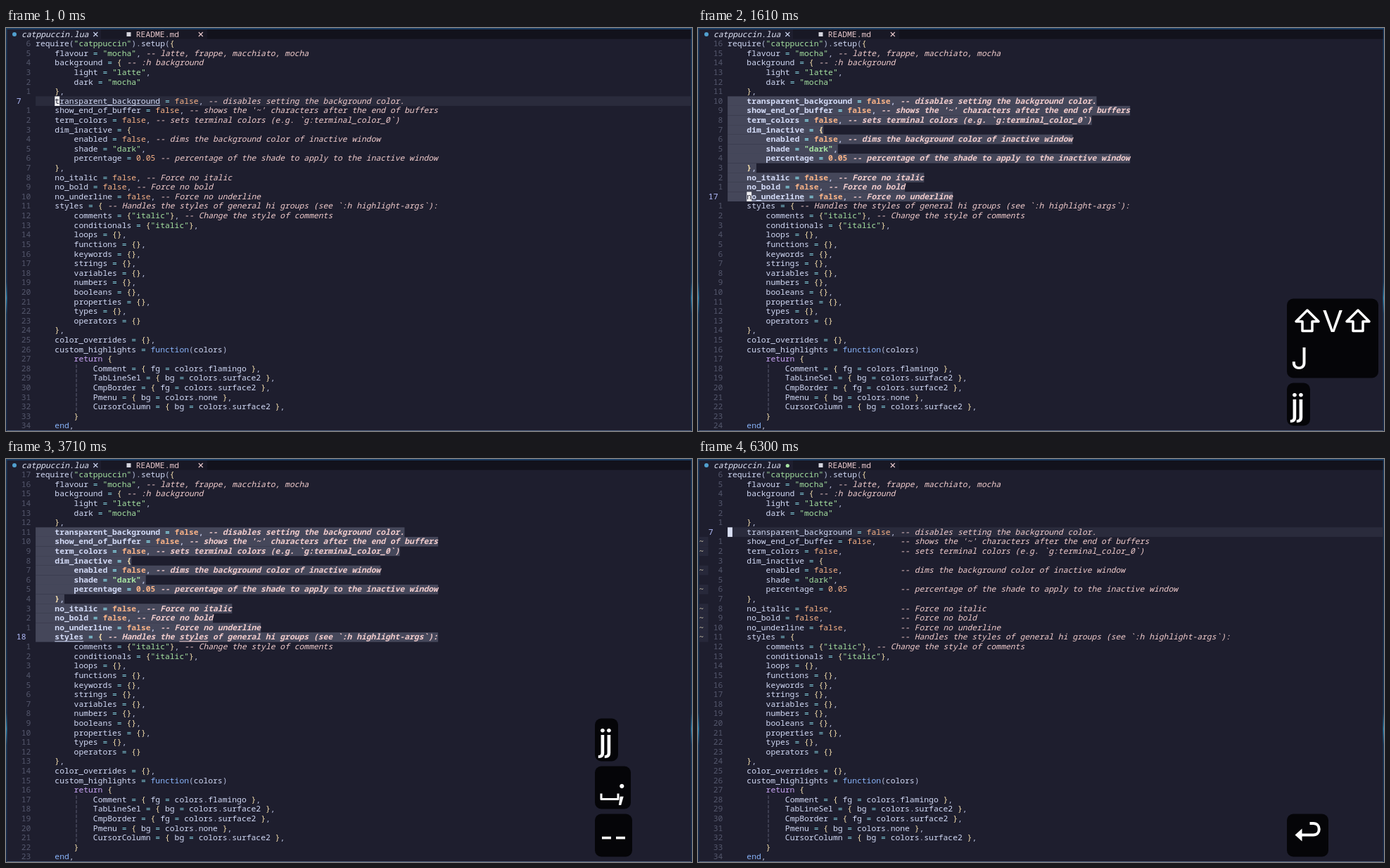
An HTML page with a canvas that plays this animation: 975 by 574 pixels, repeating every 6370 ms.

```html
<!DOCTYPE html>
<html lang="en">
<head>
<meta charset="utf-8">
<title>Aligning comments</title>
<style>
html, body { margin: 0; width: 100%; height: 100%; overflow: hidden; background: #1e1e2e; }
canvas { display: block; }
</style>
</head>
<body>
<canvas id="stage" width="975" height="574"></canvas>
<script>
const LOOP = 6370, CELL = 6.81, ROW = 13.605, LEFT = 42.1, TOP = 15.7;
const MONO = '11.35px "Noto Sans Mono", "DejaVu Sans Mono", monospace';
const ctx = document.getElementById('stage').getContext('2d');

const code = `require("catppuccin").setup({
    flavour = "mocha", -- latte, frappe, macchiato, mocha
    background = { -- :h background
        light = "latte",
        dark = "mocha"
    },
    transparent_background = false, -- disables setting the background color.
    show_end_of_buffer = false, -- shows the '~' characters after the end of buffers
    term_colors = false, -- sets terminal colors (e.g. \`g:terminal_color_0\`)
    dim_inactive = {
        enabled = false, -- dims the background color of inactive window
        shade = "dark",
        percentage = 0.05 -- percentage of the shade to apply to the inactive window
    },
    no_italic = false, -- Force no italic
    no_bold = false, -- Force no bold
    no_underline = false, -- Force no underline
    styles = { -- Handles the styles of general hi groups (see \`:h highlight-args\`):
        comments = {"italic"}, -- Change the style of comments
        conditionals = {"italic"},
        loops = {},
        functions = {},
        keywords = {},
        strings = {},
        variables = {},
        numbers = {},
        booleans = {},
        properties = {},
        types = {},
        operators = {}
    },
    color_overrides = {},
    custom_highlights = function(colors)
        return {
            Comment = { fg = colors.flamingo },
            TabLineSel = { bg = colors.surface2 },
            CmpBorder = { fg = colors.surface2 },
            Pmenu = { bg = colors.none },
            CursorColumn = { bg = colors.surface2 },
        }
    end,`.split('\n');

const FIRST = 6, LAST = 17, ALIGN_COL = 36;
const SELECT = 770, PROMPT = 2800, ALIGNED = 4270, SIGNS = 5000;
const cursorMoves = [[0, 6], [1190, 15], [1470, 16], [1680, 17], [ALIGNED, 6]];

// Each key box: [time, keys, width] states; it fades after its last state.
const LINGER = 2300, FADE = 200;
const keyBoxes = [
  [[770, '⇧V', 86], [1190, '⇧V⇧\nJ', 130]],
  [[1400, 'j', 23], [1540, 'jj', 33]],
  [[2170, '␣', 41], [2730, '␣;', 51]],
  [[3220, '-', 34], [3430, '--', 53]],
  [[4200, '⏎', 59]]
];
const advance = { '⇧': 45, V: 27, J: 23, j: 9, '␣': 29, ';': 5, '-': 20, '⏎': 46 };

const tokenRules = [
  [/^"[^"]*"/, '#a6e3a1'],
  [/^(false|0\.05)\b/, '#fab387'],
  [/^(function|end)\b/, '#89b4fa'],
  [/^return\b/, '#cba6f7'],
  [/^=/, '#89dceb'],
  [/^[{}]+/, '#f9e2af'],
  [/^[(),.]/, '#b4bcda'],
  [/^\w+/, '#d3dbf7'],
  [/^\s+/, null]
];

const colX = col => LEFT + col * CELL;
const rowY = row => TOP + row * ROW;
const latest = (states, t) => states.filter(s => s[0] <= t).pop();

function rect(x, y, w, h, fill) {
  ctx.fillStyle = fill;
  ctx.fillRect(x, y, w, h);
}

function text(str, x, y, fill, style = '500', align = 'left') {
  ctx.font = style + ' ' + MONO;
  ctx.textAlign = align;
  ctx.fillStyle = fill;
  ctx.fillText(str, x, y);
}

function stroke(points, color, width, close) {
  ctx.beginPath();
  points.forEach(([x, y]) => ctx.lineTo(x, y));
  if (close) ctx.closePath();
  ctx.strokeStyle = color;
  ctx.lineWidth = width;
  ctx.stroke();
}

function cross(x, y, color) {
  stroke([[x - 3, y - 3], [x + 3, y + 3]], color, 1.1);
  stroke([[x - 3, y + 3], [x + 3, y - 3]], color, 1.1);
}

function dot(x, y, r, fill) {
  ctx.beginPath();
  ctx.arc(x, y, r, 0, 7);
  ctx.fillStyle = fill;
  ctx.fill();
}

function drawWindow(modified) {
  const edge = ctx.createLinearGradient(0, 0, 0, 574);
  [[0, '#1a3c62'], [.3, '#142d4c'], [.63, '#163a5e'], [.67, '#2b86b4'], [.71, '#173d62'], [1, '#16294a']]
    .forEach(([p, c]) => edge.addColorStop(p, c));
  rect(0, 0, 975, 574, edge);
  rect(1.5, 2, 972, 571, '#1e1e2e');
  rect(135, 2, 151, 13.6, '#181825');
  rect(286, 2, 687.5, 13.6, '#12121c');
  dot(12, 9, 3, '#51a0cf');
  text('catppuccin.lua', 22, 12.8, '#e2e6f8', 'italic 500');
  if (modified) dot(127.3, 9.5, 2.6, '#a6e3a1');
  else cross(127.3, 9, '#cdd6f4');
  rect(171.5, 6, 6, 6, '#d5d5de');
  text('README.md', 184.8, 12.8, '#e8c8cc');
  cross(276.8, 9, '#e8c8cc');
}

function drawCode(str, y, weight) {
  let col = 0;
  while (col < str.length) {
    const rest = str.slice(col);
    const [pattern, color] = tokenRules.find(([re]) => re.test(rest));
    const token = rest.match(pattern)[0];
    if (color) text(token, colX(col), y, color, weight);
    col += token.length;
  }
}

function drawLine(line, row, cursor, aligned, selecting) {
  const y = rowY(row), base = y + 10.5;
  const split = line.indexOf(' -- ');
  const body = split < 0 ? line : line.slice(0, split);
  const inBlock = row >= FIRST && row <= LAST;
  const selected = selecting && row >= FIRST && row <= cursor;
  const weight = selected ? '600' : '500';

  if (selected) rect(LEFT, y, line.length * CELL, ROW, '#45475a');
  if (row === cursor) {
    if (!selecting) rect(LEFT, y, 973.5 - LEFT, ROW, '#2a2b3c');
    text(row + 1, colX(-4), base, '#b4befe');
  } else {
    text(Math.abs(row - cursor), colX(-1), base, '#54576c', '500', 'right');
  }
  drawCode(body, base, weight);
  if (split >= 0) {
    const col = aligned && inBlock ? ALIGN_COL : split + 1;
    text(line.slice(split + 1), colX(col), base, '#f2cdcd', 'italic ' + weight);
  }
}

function drawCursor(row, t) {
  const y = rowY(row), line = code[row];
  if (t >= ALIGNED) return rect(LEFT, y, CELL, ROW, '#d9def2');
  const word = line.trim().match(/^\w+/)[0];
  for (let at = line.indexOf(word); at >= 0; at = line.indexOf(word, at + 1))
    rect(colX(at), y + 12.3, word.length * CELL, 1, at > 4 ? '#f2cdcd' : '#cdd6f4');
  if (t >= PROMPT) return;
  rect(colX(4), y, CELL, ROW, '#f0f0f4');
  text(word[0], colX(4), y + 10.5, '#1e1e2e');
}

function drawSigns() {
  code.forEach((line, row) => {
    if (row <= FIRST || row > LAST || !line.includes(' -- ')) return;
    rect(1.5, rowY(row), 13, ROW, '#27283a');
    text('~', 1.5, rowY(row) + 10.5, '#d8cfb4');
  });
}

// Draws one key centred on x, in a text row whose top is y.
function drawKey(key, x, y) {
  const white = '#fff';
  ctx.save();
  ctx.translate(x, y);
  ctx.lineJoin = 'round';
  if (key === '⇧') {
    stroke([[0, 16.5], [16, 32.5], [7, 32.5], [7, 46], [-7, 46], [-7, 32.5], [-16, 32.5]], white, 3.5, true);
  } else if (key === '␣') {
    stroke([[-12, 39], [-12, 47], [12, 47], [12, 39]], white, 3);
  } else if (key === '-') {
    rect(-6.5, 32.3, 13, 3.6, white);
  } else if (key === '⏎') {
    ctx.beginPath();
    ctx.moveTo(3, 13.5);
    ctx.lineTo(8, 13.5);
    ctx.bezierCurveTo(19, 13.5, 19, 30, 8, 30);
    ctx.lineTo(-10, 30);
    ctx.strokeStyle = white;
    ctx.lineWidth = 4;
    ctx.stroke();
    ctx.beginPath();
    [[-18, 30], [-8, 21], [-8, 39]].forEach(p => ctx.lineTo(...p));
    ctx.fillStyle = white;
    ctx.fill();
  } else {
    ctx.font = (/[j;]/.test(key) ? 500 : 400) + ' 43px Inter, "Open Sans", sans-serif';
    ctx.textAlign = 'center';
    ctx.fillStyle = white;
    ctx.fillText(key, 0, 47);
  }
  ctx.restore();
}

function drawKeyBoxes(t) {
  let bottom = 566.5;
  [...keyBoxes].reverse().forEach(states => {
    const state = latest(states, t);
    if (!state) return;
    const [, keys, width] = state;
    const rows = keys.split('\n');
    const height = 61 + 52 * (rows.length - 1), top = bottom - height;
    const age = t - states[states.length - 1][0];
    bottom = top - 7;
    ctx.globalAlpha = Math.min(1, Math.max(0, 1 - (age - LINGER) / FADE));
    ctx.beginPath();
    ctx.roundRect(837, top, width, height, 9);
    ctx.fillStyle = '#050508';
    ctx.fill();
    rows.forEach((row, i) => {
      let x = 843.5;
      for (const key of row) {
        drawKey(key, x + advance[key] / 2, top + i * 53);
        x += advance[key];
      }
    });
    ctx.globalAlpha = 1;
  });
}

function draw(t) {
  const cursor = latest(cursorMoves, t)[1];
  const aligned = t >= ALIGNED;
  drawWindow(aligned);
  code.forEach((line, row) => drawLine(line, row, cursor, aligned, t >= SELECT && !aligned));
  ctx.setLineDash([4.8, 2]);
  stroke([[100, rowY(34) + 1], [100, rowY(39)]], '#5a5d72', 1);
  ctx.setLineDash([]);
  drawCursor(cursor, t);
  if (t >= SIGNS) drawSigns();
  rect(1.5, 573, 972, 1, '#50617f');
  drawKeyBoxes(t);
}

function tick() {
  draw(performance.now() % LOOP);
  requestAnimationFrame(tick);
}
tick();
</script>
</body>
</html>
```
